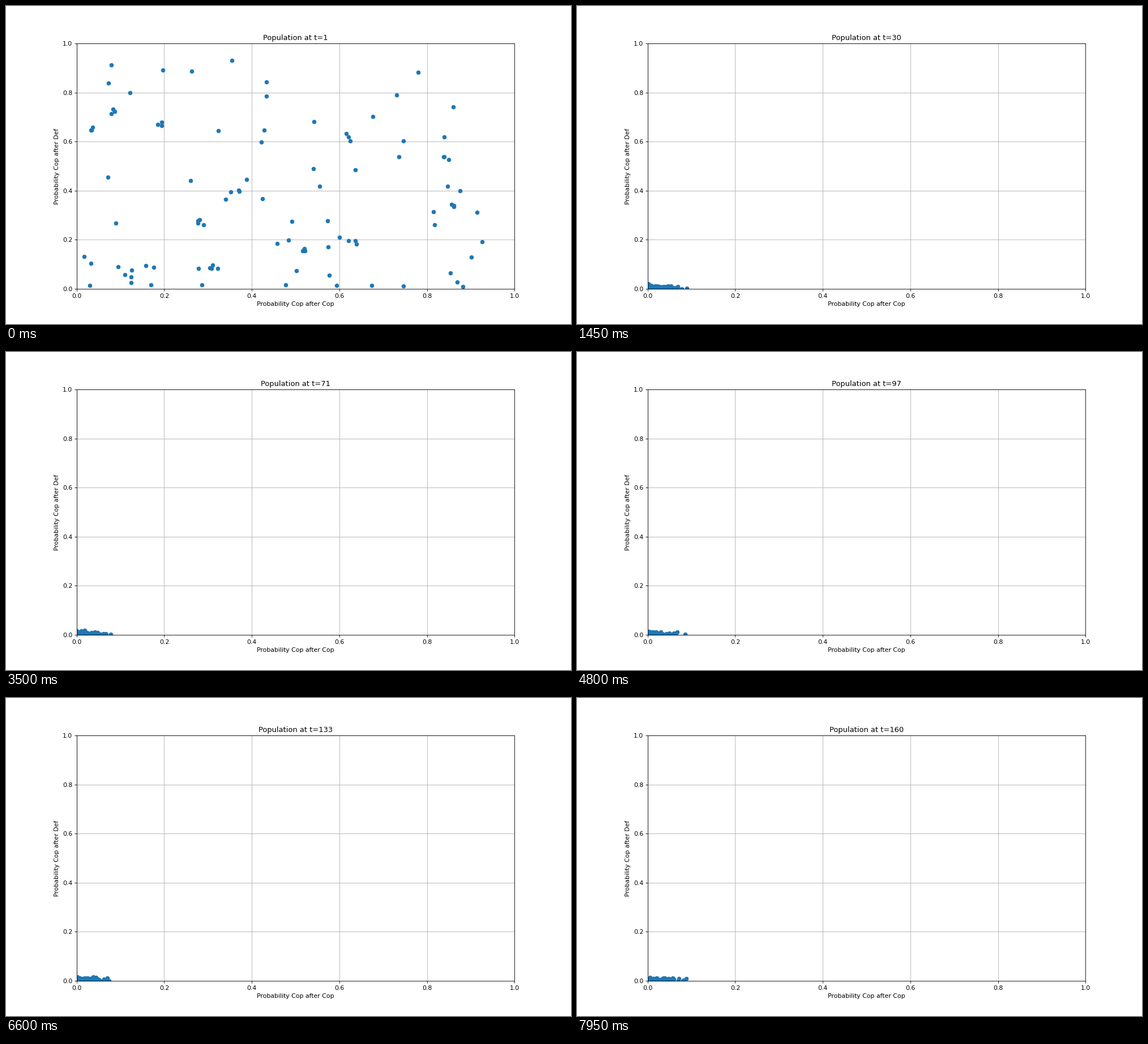
Write a matplotlib script that moves like this. It is 998 px wide and 561 px high and loops after 8 s.

```python
import numpy as np
import matplotlib.pyplot as plt
from matplotlib.animation import FuncAnimation

W, H, DPI = 998, 561, 78
STEPS, INTERVAL = 160, 50
SIZE = 98    # players
SETTLE = 13  # step at which only three families are left

# Small kin groups in the first population; everyone else is scattered
GROUPS = [(0.036, 0.656), (0.083, 0.72), (0.194, 0.674), (0.29, 0.28),
          (0.37, 0.40), (0.315, 0.09), (0.52, 0.155), (0.63, 0.196),
          (0.62, 0.615), (0.84, 0.533), (0.86, 0.345), (0.12, 0.066)]

# Centres of the lasting families as the hunt begins and ends, and their spread
EARLY = np.array([(0.036, 0.055), (0.12, 0.066), (0.594, 0.04)])
LATE = np.array([(0.02, 0.039), (0.108, 0.036), (0.574, 0.024)])
SPREAD = np.array([(0.013, 0.015), (0.014, 0.008), (0.007, 0.003)])
SHARE = (0.75, 0.22, 0.03)


def first_population(rng):
    kin = np.repeat(GROUPS, 3, axis=0)
    kin = kin + rng.normal(0, (0.007, 0.009), kin.shape)
    loners = rng.random((SIZE - len(kin), 2)) ** (1.25, 1.5)
    return np.vstack([kin, 0.01 + 0.95 * loners])


def near_parents(rng, n, alive):
    parents = alive[rng.integers(len(alive), size=n)]
    return np.abs(parents + rng.normal(0, 0.012, (n, 2)))


def family_children(rng, n, t):
    s = (t - 1) / (SETTLE - 1)
    centre = EARLY + s * (LATE - EARLY)
    kind = np.searchsorted(np.cumsum(SHARE), (np.arange(n) + 0.5) / n)
    return np.abs(rng.normal(centre[kind], SPREAD[kind]))


def corner_children(rng, n, t):
    y = 0.038 * 0.75 ** (t - SETTLE)
    return np.abs(rng.normal((0, y), (0.03, 0.0065), (n, 2)))


def evolve():
    rng = np.random.default_rng(7)
    pop = first_population(rng)
    history = [pop]
    for t in range(2, STEPS + 1):
        x, y = pop.T
        luck = rng.random(SIZE)
        if t <= SETTLE:
            # cooperation after defection is weeded out first
            y_limit = max(0.09, 0.95 * 0.75 ** (t - 1))
            dead = (y > y_limit) | (luck < (t / SETTLE) ** 2)
        else:
            x_limit = max(0.1, 0.7 - 0.15 * (t - SETTLE))
            dead = (x > x_limit) | (luck < 0.4)
        n = dead.sum()
        if t < 5:
            children = near_parents(rng, n, pop[~dead])
        elif t <= SETTLE:
            children = family_children(rng, n, t)
        else:
            children = corner_children(rng, n, t)
        pop = pop.copy()
        pop[dead] = children
        history.append(pop)
    return history


history = evolve()

plt.rcParams["font.family"] = "DejaVu Sans"
# the tiny margin keeps rounding from losing a pixel
fig, ax = plt.subplots(figsize=((W + 0.001) / DPI, (H + 0.001) / DPI), dpi=DPI)
fig.subplots_adjust(left=0.125, right=0.9, top=1 - 66.25 / H, bottom=1 - 499 / H)
ax.set(xlim=(0, 1), ylim=(0, 1),
       xlabel="Probability Cop after Cop", ylabel="Probability Cop after Def")
ax.grid(True)
dots, = ax.plot([], [], "o", color="C0")
title = ax.set_title("Population at t=1")


def draw(frame):
    dots.set_data(*history[frame].T)
    title.set_text(f"Population at t={frame + 1}")
    return dots, title


anim = FuncAnimation(fig, draw, frames=STEPS, interval=INTERVAL, repeat=True, repeat_delay=0)
plt.show()
```
